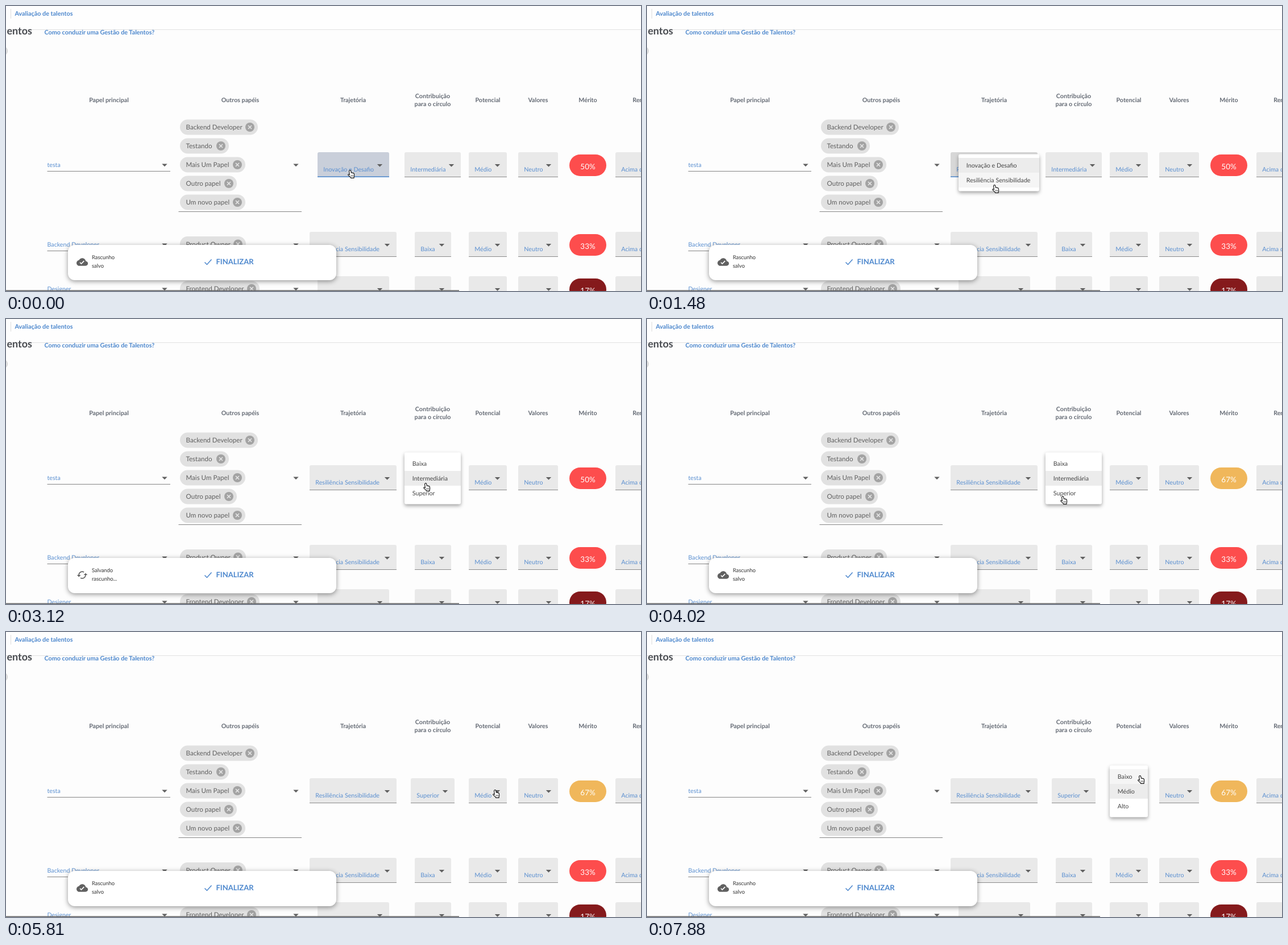
These frames come from a looping animation (1117 by 501 pixels, 8000 ms). An HTML page:

```html
<!DOCTYPE html>
<html lang="pt">
<head>
<meta charset="utf-8">
<title>Avaliação de talentos</title>
<style>
  html, body { margin: 0; width: 100%; height: 100%; overflow: hidden; background: #fdfdfd; }
  svg { display: block; width: 1117px; height: 501px; font-family: Lato, "Open Sans", sans-serif; text-rendering: geometricPrecision; }
  .head { font-weight: 700; font-size: 10.7px; fill: #646a74; text-anchor: middle; }
  .link { font-weight: 700; font-size: 10.8px; fill: #4c87cd; }
  .action { font-weight: 700; font-size: 13px; fill: #4c87cd; }
  .title { font-weight: 700; font-size: 18px; fill: #484b50; text-anchor: end; }
  .value { font-size: 10.7px; fill: #5a8fd0; }
  .chip { font-size: 11.6px; fill: #606060; }
  .pct { font-size: 13.4px; fill: #fff; text-anchor: middle; }
  .item { font-size: 10.7px; fill: #444; }
  .note { font-size: 9.4px; fill: #505050; stroke: #505050; stroke-width: .15px; }
  .panel { filter: drop-shadow(0 2px 4px rgba(0, 0, 0, .42)); }
  .menu { filter: drop-shadow(0 3px 3px rgba(0, 0, 0, .36)); }
</style>
</head>
<body>
<svg id="stage" viewBox="0 0 1117 501"></svg>
<script>
(() => {
  const LOOP = 8000, STEP = 148.5;
  const ROWS = [0, 140, 218];
  const RED = '#fd4d4d', BLUE = '#4c87cd';
  const RES = 'Resiliência Sensibilidade', INO = 'Inovação e Desafio', MID = 'Intermediária';
  // Column centres and select widths
  const COL = { traj: 610.5, cont: 750.5, pot: 847.5, val: 936, merit: 1023.5, rend: 1121 };
  const WIDTH = { [RES]: 153, [INO]: 126, [MID]: 99, Superior: 77, Baixa: 64, 'Médio': 67, Neutro: 70, 'Acima da média': 98 };

  const text = (x, y, s, cls) => `<text x="${x}" y="${y}" class="${cls}">${s}</text>`;
  const rect = (x, y, w, h, fill, rx = 0) =>
    `<rect x="${x}" y="${y}" width="${w}" height="${h}" rx="${rx}" fill="${fill}"/>`;
  const group = (id, body, cls = '') => `<g id="${id}" class="${cls}">${body}</g>`;
  const arrow = (x, y) => `<path d="M${x - 4.7} ${y - 2.5}h9.4l-4.7 4.8z" fill="#616161"/>`;
  const head = (x, y, s) => text(x, y, s, 'head');

  const chip = (cy, end, label) =>
    rect(306, cy - 13.5, end - 306, 27, '#e1e1e1', 13.5) +
    text(316.5, cy + 4, label, 'chip') +
    `<circle cx="${end - 14}" cy="${cy}" r="8" fill="#a3a3a3"/>
     <path d="M${end - 17} ${cy - 3}l6 6m0-6l-6 6" stroke="#e6e6e6" stroke-width="1.6"/>`;

  const lineSelect = (dy, label) =>
    rect(72.5, 290 + dy, 216.5, 1, '#858585') + arrow(279, 280 + dy) + arrow(510, 280 + dy) +
    text(72.5, 282.8 + dy, label, 'value');

  // Filled select box; mode is '', 'focus' or 'hover'
  function select(col, label, dy = 0, mode = '') {
    const w = WIDTH[label], x = Math.round(COL[col] - w / 2), y = 257 + dy;
    const fill = { focus: '#d7d7d7', hover: '#c9cfda' }[mode] || '#e9e9e9';
    return `<path d="M${x} ${y + 44}v-41q0-3 3-3h${w - 6}q3 0 3 3v41z" fill="${fill}"/>` +
      (mode ? rect(x, y + 42.5, w, 1.5, BLUE) : rect(x, y + 43, w, 1, '#8a8a8a')) +
      text(x + 10.3, y + 33.8, label, 'value') + arrow(x + w - 16.5, y + 23.5);
  }

  const pill = (dy, label, fill) =>
    rect(991, 261 + dy, 65, 38, fill, 19) + text(COL.merit, 287.3 + dy, label, 'pct');

  function menu(id, x, w, items, chosen, hovered) {
    const first = 280 - 26 * chosen - 13;
    const rows = items.map((label, i) => {
      const y = first + i * 26;
      return (i === chosen ? rect(x, y, w, 26, '#ececec') : '') +
        (i === hovered ? group(id + 'Hover', rect(x, y, w, 26, '#f5f5f5')) : '') +
        text(x + 13.8, y + 16.7, label, 'item');
    }).join('');
    return group(id, rect(x, first - 6.5, w, items.length * 26 + 13, '#fff', 3) + rows, 'menu');
  }

  const header = rect(0, 0, 1117, 41, '#fefefe') + rect(0, 41, 1117, 1, '#e2e2e2') + rect(8, 5, 1, 17, '#dedede') +
    text(15.5, 17, 'Avaliação de talentos', 'link') +
    text(67.5, 50.3, 'Como conduzir uma Gestão de Talentos?', 'link') +
    text(46, 50, 'entos', 'title') +
    '<circle cx="-5.5" cy="79" r="8" fill="#e4e4e4" stroke="#cfcfcf"/>';

  const heads = head(181, 169, 'Papel principal') + head(412, 169, 'Outros papéis') +
    head(COL.traj, 169, 'Trajetória') + head(COL.cont, 162, 'Contribuição') + head(COL.cont, 176, 'para o círculo') +
    head(COL.pot, 169, 'Potencial') + head(COL.val, 169, 'Valores') + head(COL.merit, 169, 'Mérito') +
    head(1131, 169, 'Rendimento');

  const chips = [['Backend Developer', 443], ['Testando', 392], ['Mais Um Papel', 421], ['Outro papel', 406], ['Um novo papel', 421]]
    .map(([label, end], i) => chip(213 + 33 * i, end, label)).join('') +
    chip(418.5, 422, 'Product Owner') + chip(497, 446, 'Frontend Developer') +
    rect(303.5, 361, 216.5, 1, '#858585');

  const rows = ROWS.map((dy, i) =>
    lineSelect(dy, ['testa', 'Backend Developer', 'Designer'][i]) +
    select('val', 'Neutro', dy) + select('rend', 'Acima da média', dy) +
    (i ? select('traj', i === 1 ? RES : INO, dy) + select('cont', 'Baixa', dy) + select('pot', 'Médio', dy) : '')
  ).join('') + pill(140, '33%', RED) + pill(218, '17%', '#851a1c');

  const live = group('low', pill(0, '50%', RED)) + group('high', pill(0, '67%', '#f0b75b')) +
    group('ino', select('traj', INO, 0, 'hover')) +
    group('resFocus', select('traj', RES, 0, 'focus')) + group('res', select('traj', RES)) +
    group('mid', select('cont', MID)) + group('midFocus', select('cont', MID, 0, 'focus')) +
    group('supFocus', select('cont', 'Superior', 0, 'focus')) + group('sup', select('cont', 'Superior')) +
    group('pot', select('pot', 'Médio')) + group('potFocus', select('pot', 'Médio', 0, 'focus'));

  const icon = d => `<path transform="translate(124 440) scale(.84)" fill="#616161" d="${d}"/>`;
  const cloud = 'M19.35 10.04C18.67 6.59 15.64 4 12 4 9.11 4 6.6 5.64 5.35 8.04 2.34 8.36 0 10.91 0 14c0 3.31 2.69 6 6 6h13c2.76 0 5-2.24 5-5 0-2.64-2.05-4.78-4.65-4.96zM10 17l-3.5-3.5 1.41-1.41L10 14.17 15.18 9l1.41 1.41z';
  const sync = 'M19 8l-4 4h3c0 3.31-2.69 6-6 6-1.01 0-1.97-.25-2.8-.7l-1.46 1.46C8.97 19.54 10.43 20 12 20c4.42 0 8-3.58 8-8h3zM6 12c0-3.31 2.69-6 6-6 1.01 0 1.97.25 2.8.7l1.46-1.46C15.03 4.46 13.57 4 12 4c-4.42 0-8 3.58-8 8H1l4 4 4-4z';
  const note = (a, b) => text(151, 445, a, 'note') + text(151, 460, b, 'note');

  const panel = `<g class="panel">${rect(109, 420, 472, 62, '#fff', 12)}</g>` +
    group('saved', icon(cloud) + note('Rascunho', 'salvo')) +
    group('saving', icon(sync) + note('Salvando', 'rascunho...')) +
    `<path d="M349.5 450.5l4 4 8-9" fill="none" stroke="${BLUE}" stroke-width="1.5"/>` +
    text(369.5, 454.3, 'FINALIZAR', 'action');

  const menus = menu('trajMenu', 548, 142, [INO, RES], 0, 1) +
    menu('contMenu', 701, 99, ['Baixa', MID, 'Superior'], 1, 2) +
    menu('potMenu', 814, 67, ['Baixo', 'Médio', 'Alto'], 1, 0);

  const hand = group('hand',
    `<path d="M3.6 .8c.9-.4 1.8 0 2 .9l.9 3.7c.4-.5 1.4-.5 1.7.2.5-.5 1.4-.3 1.6.4.6-.4 1.4 0 1.5.8l.4 3c.1 1.2-.3 2-.6 2.8v1.8H5.5l-.3-1.2C3.6 12 2.4 10.6 1 9.3.2 8.4 1.2 7.3 2.2 7.9l1.2.9-.8-6.2C2.5 1.8 3 1.1 3.6.8z" fill="#fff" stroke="#111" stroke-width="1.1" stroke-linejoin="round"/>
     <path d="M6 9.2v2.6m1.8-2.6v2.6m1.8-2.6v2.6" stroke="#222" stroke-width=".7"/>`);

  document.getElementById('stage').innerHTML =
    header + heads + chips + rows + live + panel + rect(0, 499.5, 797, 1.5, '#6a6a6a') + menus + hand;
  const el = id => document.getElementById(id);

  function show(id, alpha) {
    el(id).style.opacity = +alpha;
    el(id).style.display = alpha ? '' : 'none';
  }

  // Menus fade for one step as they open and close
  function menuAlpha(s, open, close) {
    if (s < open || s >= close) return 0;
    return s === open ? .68 : s === close - 1 ? .4 : 1;
  }

  // Pointer moves: first step, last step, end point
  const moves = [
    [0, 2, 605, 295], [6, 8, 607, 314], [10, 16, 734, 288], [22, 24, 751, 250], [26, 27, 727, 311],
    [28, 34, 846, 288], [35, 39, 856, 277], [47, 49, 862, 268], [50, 53, 863, 252]
  ];
  const ease = k => k * k * (3 - 2 * k);

  function pointer(s) {
    let x = 601, y = 288;
    for (const [from, to, px, py] of moves) {
      const k = ease(Math.min(1, Math.max(0, (s - from) / (to - from))));
      x += (px - x) * k;
      y += (py - y) * k;
    }
    return `translate(${Math.round(x)} ${Math.round(y)})`;
  }

  function draw(t) {
    const s = Math.floor((t + 10) / STEP);
    const within = (a, b) => s >= a && s < b;
    const saving = within(12, 23) || within(31, 39);

    show('ino', s < 10);
    show('resFocus', within(10, 20));
    show('res', s >= 20);
    show('mid', s < 20);
    show('midFocus', within(20, 29));
    show('supFocus', within(29, 34));
    show('sup', s >= 34);
    show('pot', s < 43);
    show('potFocus', s >= 43);
    show('low', s < 27);
    show('high', s >= 27);
    show('saving', saving);
    show('saved', !saving);
    show('trajMenu', menuAlpha(s, 5, 12));
    show('trajMenuHover', s >= 8);
    show('contMenu', menuAlpha(s, 20, 31));
    show('contMenuHover', s >= 28);
    show('potMenu', menuAlpha(s, 45, Infinity));
    show('potMenuHover', s >= 51);
    el('hand').setAttribute('transform', pointer(s));
  }

  const start = performance.now();
  function tick() {
    draw((performance.now() - start) % LOOP);
    requestAnimationFrame(tick);
  }
  tick();
})();
</script>
</body>
</html>
```
